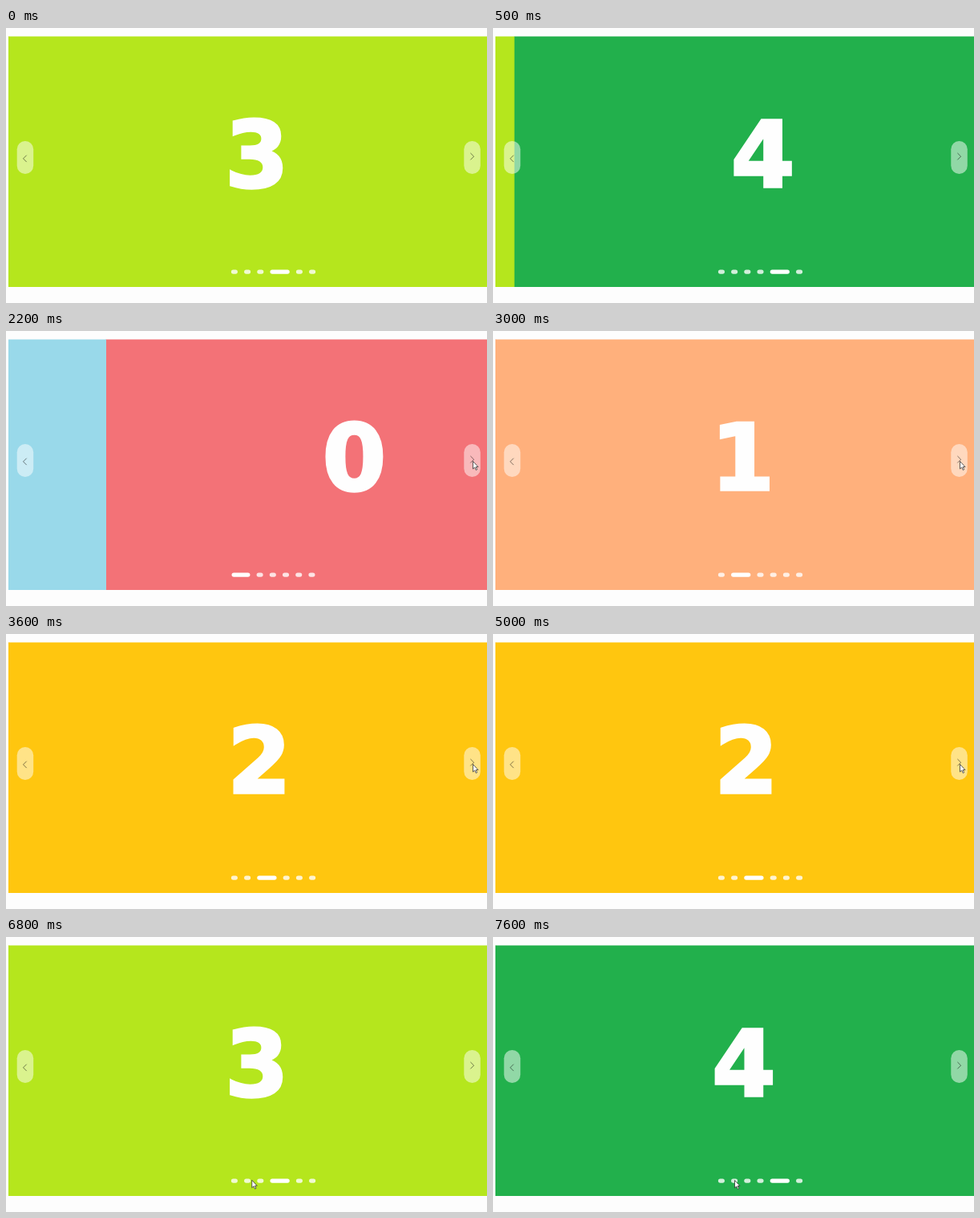
These frames come from a looping animation (600x343 px, 8 s). An HTML page:

```html
<!DOCTYPE html>
<html lang="en">
<head>
<meta charset="utf-8">
<title>Carousel</title>
<style>
  html, body { margin: 0; width: 100%; height: 100%; overflow: hidden; background: #fdfdfd; }
  svg { display: block; width: 100%; height: 100%; }
  text {
    font: bold 114px "DejaVu Sans", sans-serif;
    text-anchor: middle;
    fill: #fefefe; stroke: #fefefe; stroke-width: 3.5; stroke-linejoin: miter;
  }
  .button { fill: #fff; fill-opacity: .5; }
  .chevron { fill: none; stroke: #000; stroke-opacity: .5; }
</style>
</head>
<body>
<svg viewBox="0 0 600 343">
  <clipPath id="frame"><rect x="3" y="10.4" width="599.5" height="312.6"/></clipPath>
  <g clip-path="url(#frame)"><g id="slides"></g></g>
  <rect class="button" x="13.7" y="141" width="20.5" height="41" rx="10.2"/>
  <rect class="button" x="571.3" y="141" width="20.5" height="41" rx="10.2"/>
  <path class="chevron" d="M25.7 158.7l-4.2 4.2 4.2 4.2M579.4 156l4.2 4.2-4.2 4.2"/>
  <g id="dots" fill="#fff"></g>
  <path id="cursor" d="M0 0v9.5l2.2-2 1.5 3.4 1.5-.7-1.5-3.2h2.8z" fill="#fff" stroke="#333" stroke-width=".8"/>
</svg>
<script>
const LOOP = 8000, STEP = 100, DURATION = 400;
const LEFT = 3, WIDTH = 599.5;
const DOT = 8.1, ACTIVE_DOT = 24.3, DOTS_CENTER = 333.5;
const colors = ["#f37277", "#ffb07c", "#ffc60f", "#b5e61d", "#22b04c", "#99d9ea"];
const digitX = [313, 311.5, 316, 313, 313, 313];
const firstSlide = 3;
const slideStarts = [200, 1467, 2002, 2540, 3100, 5100, 7100];

// [time, x, y]
const cursorPath = [
  [1100, 594, 225], [1200, 590, 195], [1400, 582.5, 162.5], [5800, 582.5, 162.5],
  [6000, 520, 205], [6300, 345, 300], [6500, 261, 328], [6700, 312, 303], [6900, 301.5, 303.5]
];

const add = (parent, tag, attrs) => {
  const node = document.createElementNS("http://www.w3.org/2000/svg", tag);
  set(node, attrs);
  return parent.appendChild(node);
};
const set = (node, attrs) => {
  for (const key in attrs) node.setAttribute(key, attrs[key]);
};
const clamp = v => Math.min(1, Math.max(0, v));
const mix = (a, b, k) => a + (b - a) * k;

const byId = id => document.getElementById(id);
const cursor = byId("cursor");

const slides = colors.map((fill, i) => {
  const group = add(byId("slides"), "g", {});
  add(group, "rect", { x: LEFT, y: 10, width: WIDTH + .5, height: 314, fill });
  add(group, "text", { x: digitX[i], y: 198.3 }).textContent = i;
  return group;
});
const dots = colors.map(() => add(byId("dots"), "rect", { y: 301.4, height: 5.4, rx: 2.7 }));

// The CSS "ease" curve: cubic-bezier(.25, .1, .25, 1)
function ease(x) {
  if (x <= 0 || x >= 1) return clamp(x);
  const bezier = (a, b, u) => 3 * a * u * (1 - u) ** 2 + 3 * b * u * u * (1 - u) + u ** 3;
  let low = 0, high = 1;
  for (let i = 0; i < 24; i++) {
    const u = (low + high) / 2;
    if (bezier(.25, .25, u) < x) low = u; else high = u;
  }
  return bezier(.1, 1, low);
}

function drawSlides(current, next, p) {
  slides.forEach((slide, i) => {
    const offset = i === current ? -p : i === next ? 1 - p : null;
    set(slide, {
      visibility: offset === null ? "hidden" : "visible",
      transform: `translate(${(offset || 0) * WIDTH})`
    });
  });
}

// The old dot collapses before the new one has fully grown.
function drawDots(current, next, p) {
  const shrink = clamp(2 * p);
  const grow = 1 - (1 - clamp((p - .3) / .7)) ** 2;
  const active = dots.map((_, i) => i === current ? 1 - shrink : i === next ? grow : 0);
  const widths = active.map(a => mix(DOT, ACTIVE_DOT, a));
  const total = widths.reduce((sum, w) => sum + w, DOT * (dots.length - 1));
  let x = DOTS_CENTER - total / 2;
  dots.forEach((dot, i) => {
    set(dot, { x, width: widths[i], opacity: mix(.8, 1, active[i]) });
    x += widths[i] + DOT;
  });
}

function drawCursor(t) {
  const after = cursorPath.findIndex(point => point[0] > t);
  const b = cursorPath[after < 0 ? cursorPath.length - 1 : after];
  const a = after > 0 ? cursorPath[after - 1] : b;
  const k = a === b ? 1 : (t - a[0]) / (b[0] - a[0]);
  set(cursor, {
    visibility: t < cursorPath[0][0] ? "hidden" : "visible",
    transform: `translate(${mix(a[1], b[1], k)} ${mix(a[2], b[2], k)})`
  });
}

function draw(now) {
  const t = Math.floor(now % LOOP / STEP) * STEP;
  const started = slideStarts.filter(start => start <= t).length;
  const next = (firstSlide + started) % colors.length;
  const current = (next + colors.length - 1) % colors.length;
  const p = started ? ease((t - slideStarts[started - 1]) / DURATION) : 1;
  drawSlides(current, next, p);
  drawDots(current, next, p);
  drawCursor(t);
}

const origin = performance.now();
function tick() {
  draw(performance.now() - origin);
  requestAnimationFrame(tick);
}
tick();
</script>
</body>
</html>
```
